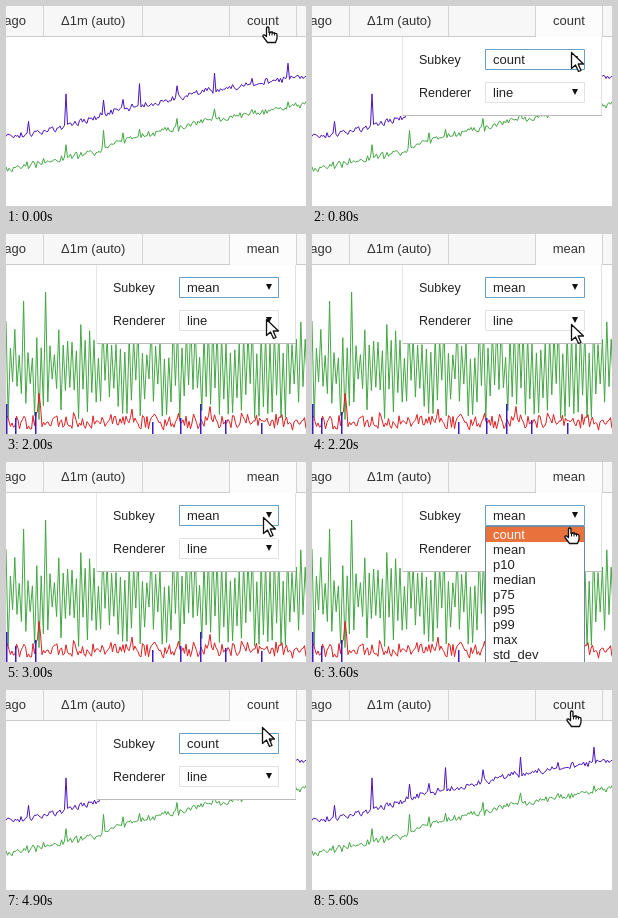
An HTML page with a canvas for the animation above (5.8 s loop, 300x200 px).

```html
<!DOCTYPE html>
<html lang="en">
<head>
<meta charset="utf-8">
<title>Chart settings</title>
<style>
html, body { margin: 0; width: 100%; height: 100%; overflow: hidden; background: #fff; }
canvas { display: block; }
</style>
</head>
<body>
<canvas id="stage" width="300" height="200"></canvas>
<script>
const g = document.getElementById('stage').getContext('2d');
const LOOP = 5800;
const FONT = '"Liberation Sans", Arial, sans-serif';
const KEYS = ['count', 'mean', 'p10', 'median', 'p75', 'p95', 'p99', 'max', 'std_dev'];
const PURPLE = '#4b14bd', GREEN = '#43a843', RED = '#dc2020';

// Pointer hotspot: time, x, y
const PATH = [
  [0, 261, 20], [200, 261, 20], [600, 258, 38], [900, 260, 50], [1200, 261, 62],
  [1500, 261, 65], [1700, 260, 145], [1800, 260, 110], [1900, 260, 82],
  [2200, 259, 90], [2400, 259, 82], [3000, 257, 55], [3300, 257, 60],
  [3600, 257, 65], [3800, 257, 67], [4100, 257, 70], [4200, 257, 70],
  [4800, 256, 40], [5400, 258, 22], [5500, 259, 20], [LOOP, 259, 20]
];

function random(seed) {
  return () => (seed = seed * 16807 % 2147483647) / 2147483647;
}

function along(points, x) {
  let i = 1;
  while (i < points.length - 1 && points[i][0] < x) i++;
  const [x0, y0] = points[i - 1], [x1, y1] = points[i];
  return y0 + (y1 - y0) * (x - x0) / (x1 - x0);
}

function pointer(t) {
  return {
    x: Math.round(along(PATH, t)),
    y: Math.round(along(PATH.map(p => [p[0], p[2]]), t))
  };
}

function trend(base, spikes, seed, noise) {
  const rnd = random(seed), points = [];
  for (let x = 0; x <= 300; x += 1.5) {
    const wobble = (rnd() + rnd() - 1) * noise;
    points.push([x, along(base, x) + wobble - (spikes[x] || 0)]);
  }
  return points;
}

function oscillation() {
  const rnd = random(83), points = [];
  for (let i = 0; i < 139; i++) {
    const x = i * 2.2;
    let y = i % 2 ? 145 + rnd() * 42 : 87 + rnd() * 38;
    if (i === 8) y = 67;
    if (i === 18) y = 58;
    points.push([x, y]);
  }
  return points;
}

const countLines = [
  [PURPLE, trend(
    [[0, 131], [40, 125], [60, 120], [90, 112], [110, 104], [150, 97], [200, 85], [250, 78], [300, 69]],
    { 22.5: 14, 60: 30, 97.5: 18, 117: 11, 133.5: 24, 171: 10, 208.5: 16, 246: 5, 282: 12 }, 417, 4)],
  [GREEN, trend(
    [[0, 164], [40, 156], [60, 152], [90, 145], [110, 137], [150, 126], [200, 115], [240, 109], [300, 97]],
    { 60: 15, 97.5: 17, 117: 10, 133.5: 9, 171: 8, 208.5: 11, 246: 5, 282: 5 }, 291, 4.5)]
];
const meanLines = [
  [GREEN, oscillation()],
  [RED, trend([[0, 189], [300, 188]],
    { 31.5: 13, 33: 23, 34.5: 12, 67.5: 8, 105: 9, 126: 8, 172.5: 10, 204: 12, 235.5: 8, 270: 9 }, 57, 9)]
];
const blueBars = [[0, 170], [9, 184], [29, 178], [146, 188], [174, 184], [194, 170], [219, 186], [255, 189]];

function box(x, y, w, h, fill, stroke) {
  g.fillStyle = fill;
  g.fillRect(x, y, w, h);
  if (stroke) {
    g.strokeStyle = stroke;
    g.lineWidth = 1;
    g.strokeRect(x + .5, y + .5, w - 1, h - 1);
  }
}

function label(s, x, y, size = 13, align = 'left', color = '#222') {
  g.font = size + 'px ' + FONT;
  g.textAlign = align;
  g.fillStyle = color;
  g.fillText(s, x, y);
}

function chart(mean) {
  g.lineWidth = 1;
  g.lineJoin = 'bevel';
  for (const [color, points] of mean ? meanLines : countLines) {
    g.strokeStyle = color;
    g.beginPath();
    points.forEach(p => g.lineTo(...p));
    g.stroke();
  }
  if (mean) for (const [x, y] of blueBars) box(x, y, 1.5, 200 - y, '#3d18c8');
}

function header(value, open) {
  box(0, 0, 300, 30, '#f7f7f7');
  box(0, 30, 300, 1, '#ccc');
  if (open) box(224, 0, 66, 31, '#fcfcfc');
  for (const x of [37, 136, 223, 290]) box(x, 0, 1, 30, '#d4d4d4');
  label('ago', 20, 19, 13, 'right', '#333');
  label('Δ1m (auto)', 55, 19, 13, 'left', '#333');
  label(value, 257, 19, 13, 'center', '#333');
}

function select(value, y, h, border) {
  box(173, y, 100, h, '#fff', border);
  label(value, 181, y + 15);
  const top = y + 7;
  g.fillStyle = '#111';
  g.beginPath();
  g.moveTo(260, top);
  g.lineTo(266, top);
  g.lineTo(263, top + 6);
  g.fill();
}

function popup(value) {
  box(91, 31, 199, 78, '#fff');
  box(90, 31, 1, 79, '#e6e6e6');
  box(289, 31, 1, 79, '#e0e0e0');
  box(91, 109, 199, 1, '#bbb');
  label('Subkey', 107, 58, 12.5);
  label('Renderer', 107, 91, 12.5);
  select(value, 43, 21, '#6a9fc0');
  select('line', 76, 21, '#e2e2e2');
}

function list(active) {
  box(173, 64, 100, 140, '#fff', '#6f8796');
  KEYS.forEach((key, i) => {
    const y = 65 + i * 15;
    if (i === active) box(174, y, 98, 15, '#e8713c');
    label(key, 181, y + 12, 13, 'left', i === active ? '#fff' : '#222');
  });
}

const ARROW = new Path2D('M0 0V16L4 12.5L7 19L9.5 18L6.7 11.5H12Z');
const HAND = new Path2D('M-1 1.5Q0 -.5 1.5 1.5V6H3V5.5H5V6.5H7V7Q9.5 6.5 9.5 8.5V12L8 16H0L-4.5 10Q-5 8 -3 8.5L-1 10Z');

function cursor(x, y, hand) {
  g.save();
  g.translate(x + .5, y + .5);
  g.lineJoin = 'round';
  g.lineWidth = 1.3;
  g.fillStyle = '#fff';
  g.strokeStyle = '#111';
  const shape = hand ? HAND : ARROW;
  g.fill(shape);
  g.stroke(shape);
  if (hand) for (const dx of [1.5, 4, 6.5]) box(dx, 6, 1, 3, '#111');
  g.restore();
}

function draw(now) {
  const t = Math.min(Math.floor(now % LOOP / 100) * 100, 5600);
  const within = (a, b) => t >= a && t < b;
  const open = within(200, 5500);
  const listing = within(1000, 1900) || within(3300, 3800);
  const mean = within(1900, 3800);
  const value = mean ? 'mean' : 'count';
  const { x, y } = pointer(t);

  box(0, 0, 300, 200, '#fff');
  chart(mean);
  header(value, open);
  if (open) popup(value);
  if (listing) list(y < 65 ? KEYS.indexOf(value) : Math.floor((y - 65) / 15));
  cursor(x, y, listing || y < 30);
  requestAnimationFrame(draw);
}
requestAnimationFrame(draw);
</script>
</body>
</html>
```
